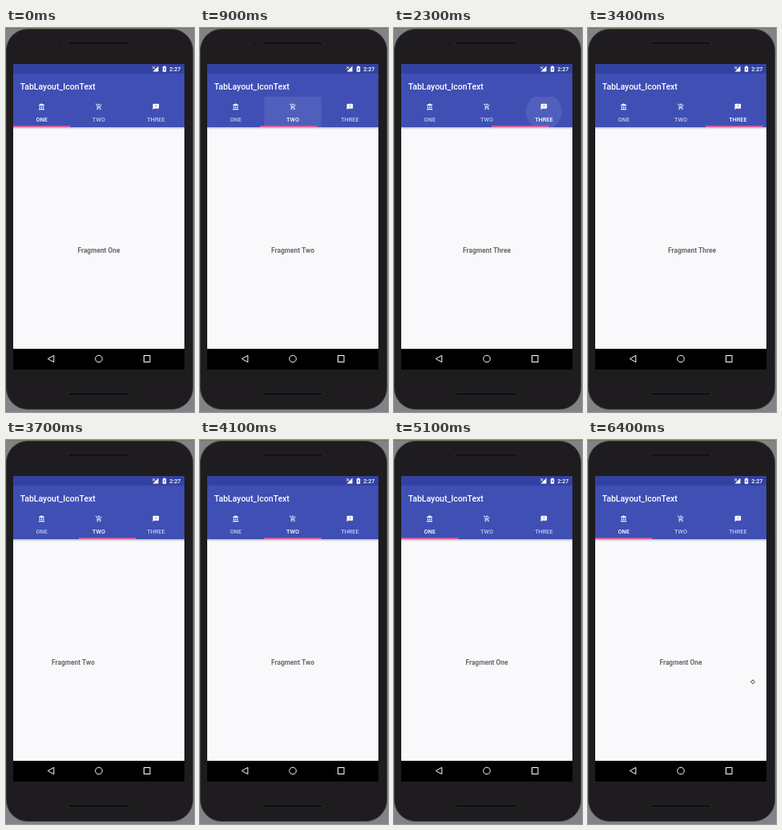
Animation, 235 px wide and 480 px high, one loop 6.5 s. Source, as an HTML page with a canvas:

```html
<!DOCTYPE html>
<html lang="en">
<head>
<meta charset="utf-8">
<title>Tabs with icons</title>
<style>
html, body { margin: 0; width: 100%; height: 100%; overflow: hidden; background: #858188; }
canvas { display: block; width: 235px; height: 480px; }
</style>
</head>
<body>
<canvas id="stage"></canvas>
<script>
const W = 235, H = 480, LOOP = 6500, STEP = 100;
const LEFT = 9, PAGE = 214, TAB = PAGE / 3, MID = LEFT + PAGE / 2;
const TOP = 45, BAR = 57, BODY = 124, NAV = 401, END = 427;
const BLUE = '#3f4fb4', DARK_BLUE = '#3342a2', PAPER = '#f9f8fb', WHITE = '#fff';
const TAP_MS = 240, DRAG_MS = 500;

const pages = ['One', 'Two', 'Three'];
const taps = [{ start: 700, tab: 1 }, { start: 2166, tab: 2 }];
const drags = [3322, 4318];

const canvas = document.getElementById('stage');
const c = canvas.getContext('2d');
const dpr = window.devicePixelRatio || 1;
canvas.width = W * dpr;
canvas.height = H * dpr;

const clamp = x => Math.min(1, Math.max(0, x));
const ease = x => (x = clamp(x), x * x * (3 - 2 * x));
const sum = (list, f) => list.reduce((total, item) => total + f(item), 0);

// A tap swaps the page at once while the indicator slides; a drag moves both.
function pose(t) {
  const dragged = drags.map(start => ease((t - start) / DRAG_MS));
  const tapped = taps.filter(tap => t >= tap.start + 100).length;
  const back = sum(dragged, d => d);
  return {
    page: tapped - back,
    selected: tapped - sum(dragged, Math.round),
    indicator: sum(taps, tap => ease((t - tap.start) / TAP_MS)) - back
  };
}

function box(x, y, w, h, fill) {
  c.fillStyle = fill;
  c.fillRect(x, y, w, h);
}

function round(x, y, w, h, r, fill) {
  c.beginPath();
  c.roundRect(x, y, w, h, r);
  c.fillStyle = fill;
  c.fill();
}

function line(points, color, width, close) {
  c.beginPath();
  points.forEach(([x, y]) => c.lineTo(x, y));
  if (close) c.closePath();
  c.strokeStyle = color;
  c.lineWidth = width;
  c.stroke();
}

function shape(points, fill) {
  c.beginPath();
  points.forEach(([x, y]) => c.lineTo(x, y));
  c.fillStyle = fill;
  c.fill();
}

function dot(x, y, r, fill) {
  c.beginPath();
  c.arc(x, y, r, 0, Math.PI * 2);
  c.fillStyle = fill;
  c.fill();
}

function text(s, x, y, size, weight, fill, align = 'center') {
  c.font = `${weight} ${size}px Roboto, sans-serif`;
  c.textAlign = align;
  c.fillStyle = fill;
  c.fillText(s, x, y);
}

function clipTo(x, y, w, h, paint) {
  c.save();
  c.beginPath();
  c.rect(x, y, w, h);
  c.clip();
  paint();
  c.restore();
}

function drawPhone() {
  box(0, 0, W, H, '#858188');
  box(0, 0, W, 1, '#76785c');
  round(0, 1, 234, 476, 27, '#39373a');
  round(1, 2, 232, 474, 26, '#1e1c1e');
  for (const y of [16.5, 455]) {
    round(76, y, 79, 5, 2.5, '#242224');
    round(78, y + 1, 75, 3, 1.5, '#121113');
  }
  dot(68, 20, 2, '#19171a');
}

function drawStatus() {
  box(LEFT, TOP, PAGE, BAR - TOP, DARK_BLUE);
  shape([[183.5, 54.5], [190.5, 54.5], [190.5, 47.5]], WHITE);
  line([[183, 48], [186.4, 51.4]], WHITE, .9);
  line([[186.4, 48], [183, 51.4]], WHITE, .9);
  round(195.8, 48.3, 4.4, 6.4, .5, WHITE);
  box(197, 47.5, 2, 1, WHITE);
  box(197.4, 50.3, 1.2, 2.4, DARK_BLUE);
  text('2:27', 218.3, 54.2, 7.2, 500, WHITE, 'right');
}

// Icons are drawn on a 24-unit grid
const icons = [
  () => {
    shape([[11.5, 1], [2, 6], [2, 8], [21, 8], [21, 6]], WHITE);
    [4, 10, 16].forEach(x => box(x, 10, 3, 7, WHITE));
    box(2, 19, 19, 3, WHITE);
  },
  () => {
    line([[1, 3], [3.7, 3], [8, 12], [16.2, 12], [20.4, 4.5]], WHITE, 2.3);
    line([[7.6, 12], [6, 16], [19, 16]], WHITE, 2.3);
    box(11, 1, 2, 8, WHITE);
    box(8, 4, 8, 2, WHITE);
    [7, 17].forEach(x => dot(x, 20, 2, WHITE));
  },
  () => {
    round(2, 2, 20, 16, 2, WHITE);
    shape([[2, 16], [2, 22], [7, 17]], WHITE);
    box(11, 6, 2, 4, BLUE);
    box(11, 12, 2, 2, BLUE);
  }
];

function drawRipple({ start, tab }, t) {
  const age = t - start;
  if (age < 0) return;
  const x = LEFT + tab * TAB;
  const alpha = .09 * clamp((500 - age) / 200);
  clipTo(x, 86, TAB, BODY - 86, () =>
    dot(x + TAB / 2, 104.5, age * age / 800, `rgba(255,255,255,${alpha})`));
}

function drawHeader(t, { selected, indicator }) {
  box(LEFT, BAR, PAGE, BODY - BAR, BLUE);
  text('TabLayout_IconText', 17.7, 76.5, 10.5, 500, WHITE, 'left');
  taps.forEach(tap => drawRipple(tap, t));
  pages.forEach((name, i) => {
    const x = LEFT + (i + .5) * TAB;
    c.save();
    c.translate(x - 4.5, 93.9);
    c.scale(.38, .38);
    icons[i]();
    c.restore();
    text(name.toUpperCase(), x, 116.8, 7.25, 500, i === selected ? WHITE : '#c3c8ea');
  });
  box(LEFT + indicator * TAB, BODY - 1.8, TAB, 1.8, '#dc6098');
}

function drawPages({ page }) {
  box(LEFT, BODY, PAGE, NAV - BODY, PAPER);
  const shade = c.createLinearGradient(0, BODY, 0, BODY + 3);
  shade.addColorStop(0, '#bdbed0');
  shade.addColorStop(1, PAPER);
  box(LEFT, BODY, PAGE, 3, shade);
  pages.forEach((name, i) =>
    text('Fragment ' + name, MID + (i - page) * PAGE, 280.5, 8.4, 700, '#6a696b'));
}

function drawNav() {
  box(LEFT, NAV, PAGE, END - NAV, '#000');
  line([[59.8, 409.3], [59.8, 417.7], [52.3, 413.5]], WHITE, 1, true);
  c.beginPath();
  c.arc(MID, 413.5, 4.3, 0, Math.PI * 2);
  c.stroke();
  c.strokeRect(172.5, 409.5, 7.5, 8);
}

function drawCursor() {
  line([[206, 299.8], [208.3, 302.3], [206, 304.8], [203.7, 302.3]], '#333', 1, true);
  dot(206, 302.3, .9, WHITE);
}

function draw(now) {
  const t = Math.floor((now % LOOP) / STEP) * STEP;
  const state = pose(t);
  c.setTransform(dpr, 0, 0, dpr, 0, 0);
  drawPhone();
  clipTo(LEFT, TOP, PAGE, END - TOP, () => {
    drawPages(state);
    drawStatus();
    drawHeader(t, state);
    drawNav();
    if (t >= LOOP - STEP) drawCursor();
  });
}

const start = performance.now();
function loop() {
  draw(performance.now() - start);
  requestAnimationFrame(loop);
}
loop();
</script>
</body>
</html>
```
